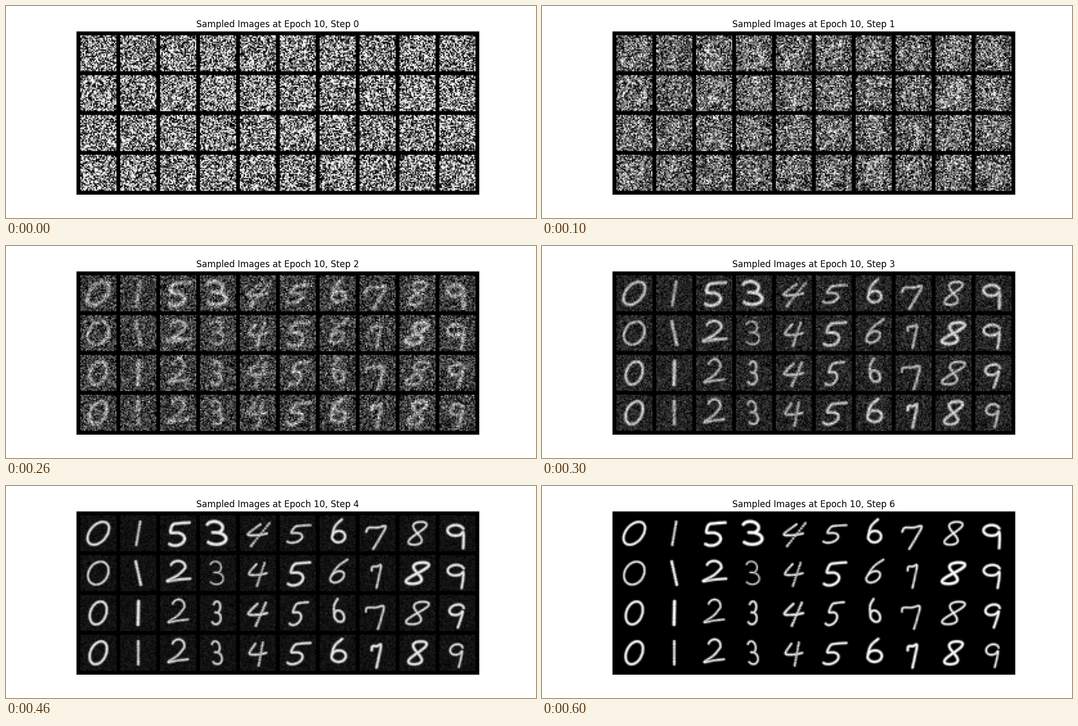
Recreate the animation shown at these times as a matplotlib script. Size 1000 by 400 pixels, loop 0.7 s.

```python
import numpy as np
import matplotlib.pyplot as plt
from matplotlib.animation import FuncAnimation

ROWS, COLS, N, PAD, STEPS = 4, 10, 28, 3, 7
PITCH = N + PAD
H, W = ROWS * PITCH + PAD, COLS * PITCH + PAD
FIT = 17.8                      # longer side of a digit, in image pixels


def arc(cx, cy, rx, ry, start, end):
    """Elliptic arc; angles in degrees, clockwise on screen."""
    a = np.radians(np.linspace(start, end, 12))
    return np.column_stack([cx + rx * np.cos(a), cy + ry * np.sin(a)])


def spline(*parts):
    """Catmull-Rom curve through all points of the parts."""
    pts = np.vstack(parts)
    p = np.vstack([pts[0], pts, pts[-1]])
    t = np.linspace(0, 1, 12)[:, None]
    return np.vstack([
        b + 0.5 * t * (c - a + t * (2 * a - 5 * b + 4 * c - d
                                    + t * (3 * (b - c) + d - a)))
        for a, b, c, d in zip(p, p[1:], p[2:], p[3:])])


def figure_eight():
    a = np.linspace(0, 2 * np.pi, 32)
    return np.column_stack([0.32 * np.sin(2 * a), -0.5 * np.cos(a)])


# Upright pen paths of unit height around the origin
SHAPES = {
    0: [spline(arc(0, 0, 0.5, 0.5, 0, 360))],
    1: [spline([(0, -0.5), (0, 0.5)])],
    2: [spline(arc(0, -0.22, 0.3, 0.28, 200, 380),
               [(0, 0.2), (-0.45, 0.5), (0, 0.43), (0.5, 0.38)])],
    3: [spline(arc(0, -0.25, 0.35, 0.25, 210, 430), [(-0.1, -0.02)],
               arc(0, 0.24, 0.45, 0.26, 280, 500))],
    4: [spline([(-0.25, -0.45), (-0.45, -0.02), (0, 0.02), (0.35, -0.05)]),
        spline([(0.1, -0.5), (0.1, 0.5)])],
    5: [spline([(0.3, -0.5), (0, -0.47), (-0.18, -0.4), (-0.22, -0.08)],
               arc(-0.05, 0.22, 0.26, 0.28, 260, 490))],
    6: [spline([(0.1, -0.5), (-0.18, -0.2)],
               arc(0, 0.25, 0.28, 0.25, 180, -170))],
    7: [spline([(-0.42, -0.27), (-0.38, -0.44), (0, -0.45), (0.35, -0.5),
                (0.3, 0), (0.2, 0.5)])],
    8: [spline(figure_eight())],
    9: [spline(arc(-0.05, -0.27, 0.32, 0.23, -20, -340),
               [(0.27, 0.1), (0.25, 0.5)])],
}

edge = np.full((H, W), 9.0)     # signed distance to the nearest stroke edge


def write(row, col, shape, stretch, slant, pen):
    """Write one digit, fitted to its cell and centred by its mass."""
    shear = np.array([[stretch, 0], [-slant, 1]])
    strokes = [s @ shear for s in SHAPES[shape]]
    pts = np.vstack(strokes)
    mass = np.concatenate([np.hypot(*np.gradient(s, axis=0).T)
                           for s in strokes])
    centre = np.average(pts, axis=0, weights=mass)
    pts = (pts - centre) * FIT / np.ptp(pts, axis=0).max() + N / 2 - 0.5
    y, x = np.mgrid[:N, :N]
    dist = np.hypot(x[..., None] - pts[:, 0], y[..., None] - pts[:, 1])
    top, left = PAD + row * PITCH, PAD + col * PITCH
    edge[top:top + N, left:left + N] = dist.min(-1) - pen / 2


def column(digit, *hands):
    """Write a digit down its column, each time with stretch, slant, pen."""
    first = ROWS - len(hands)
    for row, hand in enumerate(hands, first):
        write(row, digit, digit, *hand)


column(0, (0.85, 0.4, 1.9), (0.88, 0.2, 1.6), (0.72, 0.2, 1.9), (0.72, 0.25, 2))
column(1, (1, 0.17, 1.9), (1, -0.22, 2.3), (1, 0.02, 2.6), (1, 0, 2.1))
write(0, 2, 5, 1.5, 0.1, 2.3)   # a two that came out as a five
column(2, (1.2, 0, 2), (0.9, 0.05, 1.5), (0.9, 0.05, 1.7))
column(3, (1, -0.1, 2.5), (0.7, -0.05, 1.1), (0.45, 0.05, 1.6), (0.5, -0.1, 1.5))
column(4, (1, 0.8, 1.7), (0.95, 0.33, 1.6), (1, 0.43, 1.9), (0.9, 0.18, 1.7))
column(5, (1.7, 0.45, 1.6), (1.4, 0.25, 2.1), (1, 0.3, 1.7), (1.45, 0.35, 1.9))
column(6, (1, 0.05, 2), (1, 0.45, 1.6), (0.75, -0.2, 1.8), (1.1, 0.05, 2.1))
column(7, (1, 0.4, 1.7), (0.5, 0.12, 1.6), (1, 0.1, 1.6), (0.5, 0.12, 2.1))
column(8, (0.9, 0.3, 1.6), (1.1, 0.5, 2.3), (1, 0.5, 1.6), (0.9, 0.3, 2.1))
column(9, (1.1, 0, 2.2), (1.1, 0.1, 2), (0.95, 0.3, 2), (0.85, 0.2, 1.6))

noise = np.random.default_rng(10).normal(size=(H, W))
in_cell = np.outer(np.arange(H) % PITCH >= PAD, np.arange(W) % PITCH >= PAD)


def sample(step):
    """Blend from clipped noise to digits that sharpen on the way."""
    left = 1 - step / (STEPS - 1)
    ink = np.clip(0.5 - edge / (1.3 + 8 * left ** 4), 0, 1)
    img = 0.5 + (1 - left ** 1.8) * (ink - 0.5) + 0.5 * left ** 2.6 * noise
    return np.where(in_cell, np.clip(img, 0, 1), 0)


fig, ax = plt.subplots(figsize=(10, 4), dpi=100)
ax.axis("off")
picture = ax.imshow(sample(0), cmap="gray", vmin=0, vmax=1)
title = ax.set_title("")


def update(step):
    picture.set_data(sample(step))
    title.set_text(f"Sampled Images at Epoch 10, Step {step}")
    return picture, title


anim = FuncAnimation(fig, update, frames=STEPS, interval=100,
                     repeat=True, repeat_delay=0)
plt.show()
```
